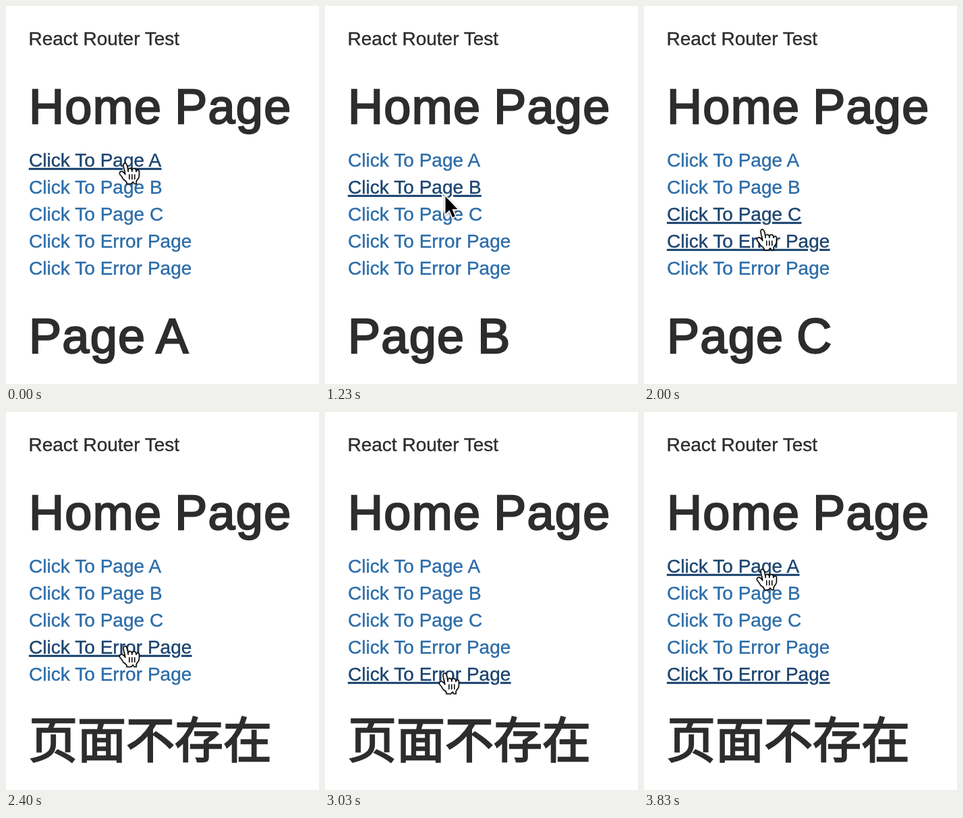
Animation, 464 px wide and 560 px high, one loop 3.86 s. Source, as an HTML page:

```html
<!DOCTYPE html>
<html lang="en">
<head>
<meta charset="utf-8">
<title>React Router Test</title>
<style>
  html, body { margin: 0; width: 100%; height: 100%; overflow: hidden; background: #fff; }
  svg { display: block; width: 464px; height: 560px; }
  text { font-family: "Liberation Sans", Arial, sans-serif; font-size: 28px; fill: #2d2d2d; stroke: #2d2d2d; stroke-width: .4px; }
  .title { font-size: 72px; letter-spacing: 1.3px; word-spacing: -2.4px; stroke-width: 2.3px; }
  .cjk { font-family: "Noto Sans CJK SC", "Noto Sans CJK", sans-serif; font-weight: 500; letter-spacing: 0; }
  .link { fill: #2b6ca9; stroke: #2b6ca9; letter-spacing: .04px; }
  .link.on { fill: #1c446f; stroke: #1c446f; text-decoration: underline; text-decoration-thickness: 1.6px; text-underline-offset: 1.4px; }
  #hand { filter: drop-shadow(0 .8px .7px rgba(0, 0, 0, .4)); }
  #arrow { filter: drop-shadow(0 1.6px 1.4px rgba(0, 0, 0, .4)); }
</style>
</head>
<body>
<svg viewBox="0 0 464 560">
  <text x="33.5" y="58">React Router Test</text>
  <text class="title" x="34" y="173.7">Home Page</text>
  <g id="links"></g>
  <text id="page" x="34"></text>
  <g id="cursor">
    <g id="hand" transform="scale(2) translate(-12.2 -8.4)" stroke="#000" stroke-width=".75" stroke-linejoin="round" stroke-linecap="round">
      <path fill="#fff" d="M11.3 20.4c-.3-.4-.6-1.1-1.2-2-.3-.5-1.2-1.5-1.5-1.9-.2-.4-.2-.6-.1-1 .1-.6.7-1.1 1.4-1.1.5 0 1 .4 1.4.7.2.2.5.6.7.8.2.2.2.3.4.5.2.3.3.5.2.1-.1-.5-.2-1.3-.4-2.1-.1-.6-.2-.7-.3-1.1-.1-.5-.2-.8-.3-1.3-.1-.3-.2-1.1-.3-1.5-.1-.5-.1-1.4.3-1.8.3-.3.9-.4 1.3-.2.5.3.8 1 .9 1.3.2.5.4 1.2.5 2 .2 1 .5 2.5.5 2.8 0-.4-.1-1.1 0-1.5.1-.3.3-.7.7-.8.3-.1.6-.1.9-.1.3.1.6.3.8.5.4.6.4 1.9.4 1.8.1-.4.1-1.2.3-1.6.1-.2.5-.4.7-.5.3-.1.7-.1 1 0 .2 0 .6.3.7.5.2.3.3 1.3.4 1.7 0 .1.1-.4.3-.7.4-.6 1.8-.8 1.9.6v2.3c0 .4-.1 1.3-.2 1.7-.1.3-.4 1-.7 1.4 0 0-1.1 1.2-1.2 1.8-.1.6-.1.6-.1 1s.1.9.1.9-.8.1-1.2 0c-.4-.1-.9-.8-1-1.1-.2-.3-.5-.3-.7 0-.2.4-.7 1.1-1.1 1.1-.7.1-2.1 0-3.1 0 0 0 .2-1-.2-1.4l-1.1-1.1z"/>
      <path fill="none" d="M15.6 16.8v3.4M17.6 16.8v3.4M19.6 16.8v3.4"/>
    </g>
    <path id="arrow" d="M0 0V26L6 20.3 10.4 31 14.4 29.3 10 18.8H18Z" transform="translate(.5 1)" stroke="#fff" stroke-width="3.4" paint-order="stroke"/>
  </g>
</svg>
<script>
const LOOP = 3860;
const labels = ["Page A", "Page B", "Page C", "Error Page", "Error Page"];
const pages = ["Page A", "Page B", "Page C", "页面不存在", "页面不存在"];
const clicks = [0, 1080, 1680, 2230, 2960];   // click time of each link
const path = [                                // time, x, y of the pointer tip
  [0, 176, 233], [430, 176, 233], [900, 177, 272], [1110, 177, 272],
  [1230, 178, 281], [1450, 176, 311], [1760, 175, 312], [2000, 175, 331],
  [2200, 176, 347], [2560, 176, 347], [2880, 177, 387], [3110, 177, 387],
  [3530, 177, 336], [3600, 176, 318], [3830, 175, 233], [3860, 175, 233]
];
const get = id => document.getElementById(id);
const page = get("page"), cursor = get("cursor"), hand = get("hand"), arrow = get("arrow");

const links = labels.map((label, i) => {
  const el = document.createElementNS("http://www.w3.org/2000/svg", "text");
  el.setAttribute("x", 34);
  el.setAttribute("y", 238 + 40 * i);
  el.textContent = "Click To " + label;
  get("links").append(el);
  return el;
});

// Smooth curve through the path points without overshoot
function slope(i, k) {
  if (!path[i - 1] || !path[i + 1]) return 0;
  const rate = j => (path[j + 1][k] - path[j][k]) / (path[j + 1][0] - path[j][0]);
  const a = rate(i - 1), b = rate(i);
  return a * b > 0 ? 2 * a * b / (a + b) : 0;
}
function along(t, k) {
  const i = path.findIndex((p, n) => n + 1 === path.length - 1 || t < path[n + 1][0]);
  const p = path[i], q = path[i + 1], d = q[0] - p[0], u = (t - p[0]) / d, v = 1 - u;
  return v * v * (1 + 2 * u) * p[k] + u * u * (3 - 2 * u) * q[k]
    + d * u * v * (v * slope(i, k) - u * slope(i + 1, k));
}

function draw(t) {
  const x = along(t, 1), y = along(t, 2);
  const row = (y - 210) / 40;
  const hover = row % 1 < .76 ? Math.floor(row) : -1;
  const focus = clicks.filter(c => c <= t).length - 1;
  const missing = focus > 2;
  links.forEach((el, i) => el.setAttribute("class", i === hover || i === focus ? "link on" : "link"));
  page.textContent = pages[focus];
  page.setAttribute("class", missing ? "title cjk" : "title");
  page.setAttribute("y", missing ? 512 : 513.5);
  cursor.setAttribute("transform", `translate(${x.toFixed(2)} ${y.toFixed(2)})`);
  hand.style.display = hover < 0 ? "none" : "";
  arrow.style.display = hover < 0 ? "" : "none";
}

const start = performance.now();
function tick() {
  draw((performance.now() - start) % LOOP);
  requestAnimationFrame(tick);
}
draw(0);
tick();
</script>
</body>
</html>
```
